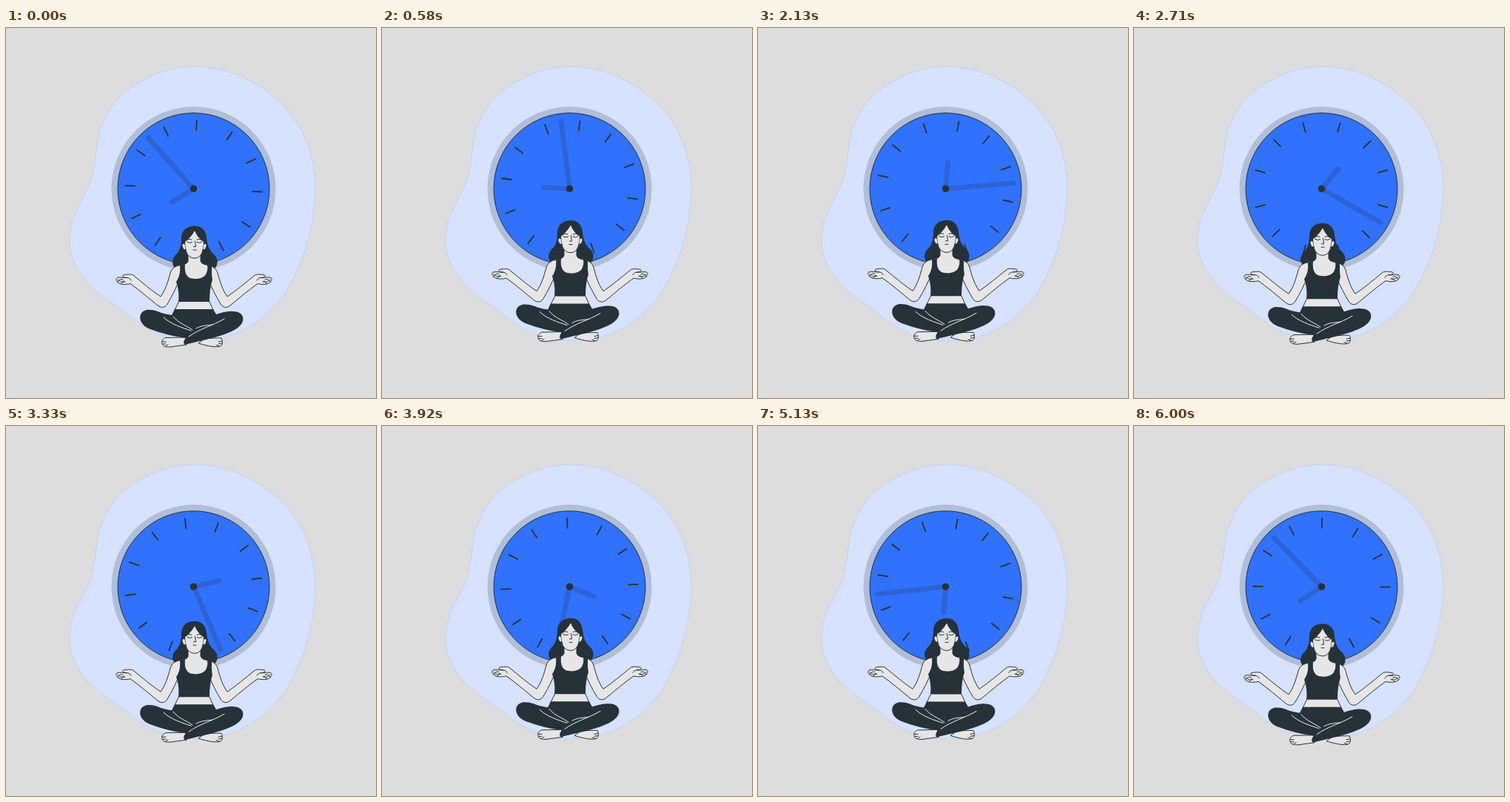
These frames come from a looping animation (500x500 px, 6040 ms). An HTML page:

```html
<!DOCTYPE html>
<html lang="en">
<head>
<meta charset="utf-8">
<title>Meditation clock</title>
<style>
  html, body { margin: 0; width: 100%; height: 100%; overflow: hidden; background: #ddd; }
  svg { display: block; width: 100vw; height: 100vh; }
  .dark { fill: #263238; }
  .skin { fill: #e6e6e6; stroke: #263238; stroke-width: 1; stroke-linejoin: round; }
  .line { fill: none; stroke: #263238; stroke-width: 1; stroke-linecap: round; stroke-linejoin: round; }
  .seam { fill: none; stroke: #f0f0f0; stroke-width: 1; stroke-linecap: round; }
</style>
</head>
<body>
<svg viewBox="0 0 500 500">
  <rect width="500" height="500" fill="#ddd"/>
  <path fill="#d6e2ff" stroke="#b4c8f4" stroke-width=".6" d="M258 52 C304 53 347 76 376 106 C405 137 418 178 418 216 C418 260 404 316 377 358 C352 394 313 422 257 422.500 C216 422 188 407 165 388 C140 367 107 353 92 316 C82 291 85 268 96 245 C104 228 114 214 118 193 C123 167 122 142 138 114 C158 78 210 51 258 52Z"/>

  <circle cx="253.500" cy="217.300" r="111" fill="#b1bed7"/>
  <circle cx="253.500" cy="217.300" r="102.500" fill="#3072ff" stroke="#263238"/>
  <g id="dial">
    <g id="ticks" stroke="#263238" stroke-width="1.800" stroke-linecap="round"></g>
    <g id="hands" stroke="#2c64d7" stroke-width="7" stroke-linecap="round"></g>
  </g>
  <circle class="dark" cx="253.500" cy="217.200" r="4.800"/>

  <g id="woman">
    <path class="dark" d="M254 267.500 C264 267 270 273 271 283 C272 294 275 301 281 306 C287 312 287 320 282 325 L229 325 C223 319 224 311 231 305 C236 299 237 292 237 283 C238 273 244 268 254 267.500Z"/>

    <g id="arm">
      <path class="skin" d="M236 320 C228 322 224 325 222 331 C219 343 215 355 209 363 C197 355 184 344 173 335 C170 332 165 333 160 333.500 C157 334 157 336 160 337 L164 337.500 C159 338 154 336 150 337.500 C148 339 149 342 151 343.500 C154 347 162 347 168 345.500 C180 354 193 365 205 375 C210 379 215 378 218 373 C224 363 230 351 234 341Z"/>
      <path class="line" d="M151 340 C154 343 157 344 160 343 M151 343.500 C152 340 155 339 158 340 M156 345.500 C157 342 160 341 161 343 M164 337.500 C167 338 168 339 169 341"/>
    </g>
    <use href="#arm" transform="translate(508 0) scale(-1 1)"/>

    <path fill="#e6e6e6" d="M246 304 L246 315 C245 319 239 320 234 321 L232 345 L234 370 L228 381 H280 L275 370 L277 345 L275 321 C267 320 263 318 263 314 L263 304Z"/>
    <path class="line" d="M246 306 V315 C245 319 239 320 234 321 M263 306 V314 C263 318 268 320 276 321 M233.500 370 L228 381 M275 370 L280 381"/>
    <path class="dark" d="M235 321 L242 319.500 C241 329 243 337 251 338.500 C259 340 267 338 270 333 C272 329 273 325 272 320 L278 321.500 C278 330 278 336 279 340 C276 349 275 359 275 370 H233 C234 360 233 352 230 343 C234 337 236 330 235 321Z"/>

    <path class="skin" stroke-width=".7" d="M242 292 C238 290 237 294 239 297 C240 300 242 300 243 299Z M267 292 C271 290 272 294 270 297 C269 300 267 300 266 299Z"/>
    <path fill="#e6e6e6" d="M255 274 C251 281 246 286 242 289 L243 300 C244 307 249 311 255 311 C261 311 265 306 266 300 L267 289 C262 286 258 281 255 274Z"/>
    <path class="line" d="M243 299 C244 307 249 311 255 311 C261 311 265 306 266 299"/>
    <path class="line" d="M244.500 289 Q248 291.500 251.500 289.500 M258 289.500 Q261.500 291.500 265 289 M255.500 288 L256.500 295.500 H253.500 M253 300 H257"/>
    <path class="line" stroke-width="1.300" d="M245 286 Q248 284.500 251 286 M258 286 Q261 284.500 264 286"/>

    <path class="skin" d="M216 418.500 C212 420 210 423 211 426 C211 430 216 431.500 222 431 L244 428 L243 418Z M268 420 C277 419 284 419 291 419 C293 423 293 428 290 430 C284 432 273 430 260 426Z"/>
    <path class="line" d="M211 424 L216 424 M212 427 L216 427 M216 429.500 L219 428 M292 423 L287 424 M292 426 L287 427 M288 430 L284 428.500"/>
    <path class="dark" d="M228 380 H280 L284 387 C291 385 299 382 307 383 C317 383 322 389 320 396 C317 406 302 412 289 416 C273 421 256 424 242 428 C239 426 240 422 243 419 C228 417 208 412 195 407 C184 403 179 394 182 387 C186 379 196 380 205 383 C212 386 218 387 224 388Z"/>
    <path class="seam" d="M213 391 C222 400 238 405 250 409 M226 390 C233 399 244 402 252 408 M295 393 C278 403 262 406 247 417 M257 406 C263 402 271 402 279 401"/>
  </g>
</svg>
<script>
  const LOOP = 6040, CX = 253.5, CY = 217.2;
  const BOB_HEIGHT = 8.2, BOBS = 4;
  const dial = document.getElementById('dial');
  const woman = document.getElementById('woman');

  function addSpoke(parent, angle, from, to) {
    const line = document.createElementNS('http://www.w3.org/2000/svg', 'line');
    line.setAttribute('y1', -from);
    line.setAttribute('y2', -to);
    line.setAttribute('transform', `rotate(${angle})`);
    document.getElementById(parent).append(line);
  }

  // The quarter marks sit slightly behind the even spacing of the others.
  for (let i = 0; i < 12; i++) addSpoke('ticks', i * 30 + (i % 3 ? 1.6 : 0), 79.5, 92.5);
  addSpoke('hands', 315.6, 0, 92);
  addSpoke('hands', 235.8, 0, 35);

  function draw(time) {
    const phase = (time % LOOP) / LOOP;
    const angle = 2.6 + 360 * phase;
    const lift = BOB_HEIGHT * Math.abs(Math.sin(Math.PI * BOBS * phase)) ** 1.5;
    dial.setAttribute('transform', `translate(${CX} ${CY}) rotate(${angle})`);
    woman.setAttribute('transform', `translate(0 ${-lift})`);
  }

  const start = performance.now();
  function tick() {
    draw(performance.now() - start);
    requestAnimationFrame(tick);
  }
  tick();
</script>
</body>
</html>
```
